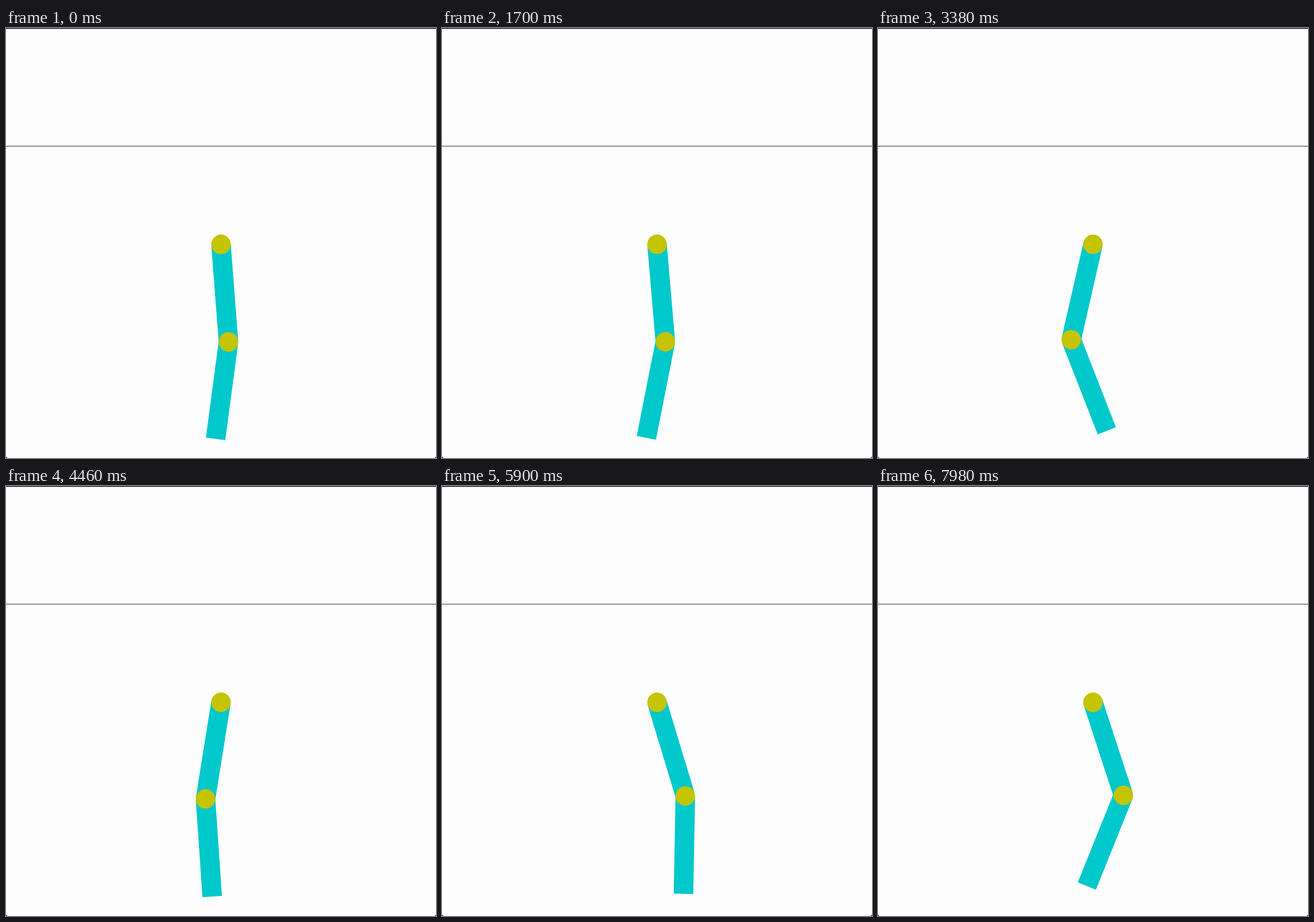
An HTML page that plays this animation: 749x748 px, repeating every 8 s.

```html
<!DOCTYPE html>
<html lang="en">
<head>
<meta charset="utf-8">
<title>Double pendulum</title>
<style>
  html, body { margin: 0; width: 100%; height: 100%; overflow: hidden; background: #fdfdfd; }
  svg { display: block; width: 749px; height: 748px; }
  .link { fill: #00c8cb; }
  .joint { fill: #c4c400; }
</style>
</head>
<body>
<svg viewBox="0 0 749 748">
  <rect width="749" height="748" fill="#fdfdfd"/>
  <rect width="749" height="1.3" fill="#000"/>
  <path d="M0 744Q0 748 4 748H0ZM749 744Q749 748 745 748H749Z" fill="#222"/>
  <rect y="205" width="749" height="1" fill="#333"/>
  <g id="upper">
    <rect class="link" x="-17" width="34" height="170.2"/>
    <circle class="joint" r="17"/>
  </g>
  <g id="lower">
    <rect class="link" x="-17" width="34" height="170.2"/>
    <circle class="joint" r="17"/>
  </g>
</svg>
<script>
const LOOP = 8000;
const LENGTH = 170.2;
const PIVOT = { x: 374.5, y: 376.3 };
const RAD = Math.PI / 180;

// The swing is a sum of two normal modes whose amplitude and phase drift.
// step, fast amplitude (deg), fast phase (rad), slow amplitude, slow phase
const KEYS = [
  [0, 11, -1.07, 2.2, 1.99],
  [37, 12, 19.848, 2.4, 16.549],
  [73, 17, 40.39, 2.8, 30.903],
  [95, 23, 52.21, 2.8, 39.529],
  [127, 29.5, 70.185, 3, 50.739],
  [148, 28, 81.247, 3, 57.729],
  [171, 21.5, 93.847, 3, 66.955]
];

const upper = document.getElementById("upper");
const lower = document.getElementById("lower");

// Three steps every 140 ms, held for 20, 100 and 20 ms.
function stepAt(ms) {
  const rest = ms % 140;
  return 3 * Math.floor(ms / 140) + (rest >= 20) + (rest >= 120);
}

function modesAt(step) {
  const next = Math.max(1, KEYS.findIndex(key => key[0] >= step));
  const a = KEYS[next - 1], b = KEYS[next];
  const k = (step - a[0]) / (b[0] - a[0]);
  const [, fastAmp, fastPhase, slowAmp, slowPhase] = a.map((v, i) => v + (b[i] - v) * k);
  return { fast: fastAmp * Math.cos(fastPhase), slow: slowAmp * Math.cos(slowPhase) };
}

function place(link, x, y, angle) {
  link.setAttribute("transform", `translate(${x} ${y}) rotate(${-angle})`);
}

function draw(now) {
  const { fast, slow } = modesAt(stepAt(now % LOOP));
  const angle1 = slow + fast;
  const angle2 = 3.8 * slow - 0.79 * fast;
  place(upper, PIVOT.x, PIVOT.y, angle1);
  place(lower,
    PIVOT.x + LENGTH * Math.sin(angle1 * RAD),
    PIVOT.y + LENGTH * Math.cos(angle1 * RAD),
    angle2);
}

const start = performance.now();
function tick() {
  draw(performance.now() - start);
  requestAnimationFrame(tick);
}
tick();
</script>
</body>
</html>
```
